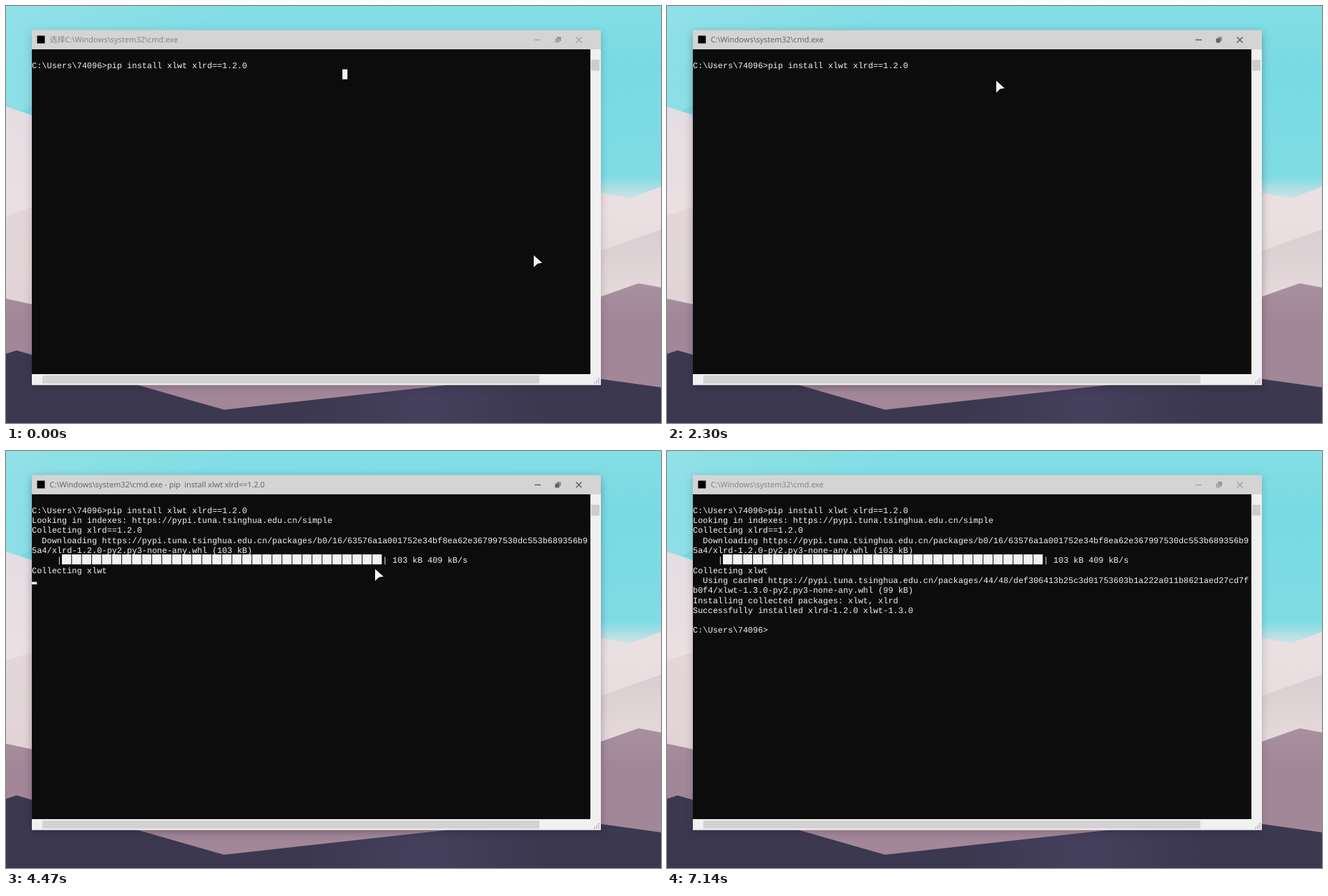
Animation of 937x597 px, one loop 7290 ms. Source, as an HTML page:

```html
<!DOCTYPE html>
<html lang="en">
<head>
<meta charset="utf-8">
<title>Package install in a terminal</title>
<style>
  html, body { margin: 0; width: 100%; height: 100%; overflow: hidden; background: #3c3850; }
  svg { display: block; width: 100vw; height: 100vh; }
  text { white-space: pre; text-rendering: geometricPrecision; }
  #console text { font: 11.94px "Liberation Mono", monospace; fill: #f2f2f2; }
  #title { font: 11px "Noto Sans", "Noto Sans CJK SC", sans-serif; }
</style>
</head>
<body>
<svg viewBox="0 0 937 597" preserveAspectRatio="none">
  <defs>
    <linearGradient id="sky" x2="0" y2="1">
      <stop offset="0" stop-color="#83dee5"/>
      <stop offset=".3" stop-color="#79dae3"/>
      <stop offset=".84" stop-color="#7edce4"/>
      <stop offset=".93" stop-color="#c3e1e6"/>
      <stop offset="1" stop-color="#e2dfe2"/>
    </linearGradient>
    <linearGradient id="skyLeft">
      <stop offset="0" stop-color="#9ae2e8" stop-opacity=".6"/>
      <stop offset="1" stop-color="#9ae2e8" stop-opacity="0"/>
    </linearGradient>
    <linearGradient id="snow" x2="0" y2="1">
      <stop offset="0" stop-color="#e4dde2"/>
      <stop offset=".5" stop-color="#ebe0e1"/>
      <stop offset="1" stop-color="#e3d6d7"/>
    </linearGradient>
    <linearGradient id="slope" x2="0" y2="1">
      <stop offset="0" stop-color="#dacdd1"/>
      <stop offset="1" stop-color="#e6dadb"/>
    </linearGradient>
    <linearGradient id="mauve" x2="0" y2="1">
      <stop offset="0" stop-color="#a8909f"/>
      <stop offset=".25" stop-color="#a28799"/>
      <stop offset="1" stop-color="#a28799"/>
    </linearGradient>
    <radialGradient id="night" gradientUnits="userSpaceOnUse" cx="600" cy="575" r="170">
      <stop offset="0" stop-color="#45405d"/>
      <stop offset="1" stop-color="#3c3850"/>
    </radialGradient>
  </defs>

  <rect width="937" height="290" fill="url(#sky)"/>
  <path d="M0 0H330L0 160Z" fill="url(#skyLeft)"/>
  <path d="M0 144L37 156L500 300L851 268L893 275L937 259V450H0Z" fill="url(#snow)"/>
  <path d="M0 300L37 288V430H0Z" fill="#e1d4d6" opacity=".8"/>
  <path d="M830 358L937 320V420H830Z" fill="url(#slope)"/>
  <path d="M0 419L37 427L400 480L851 416L905 397L937 403V597H0Z" fill="url(#mauve)"/>
  <path d="M0 498L15 493L312 578L790 525L851 534L937 546V597H0Z" fill="url(#night)"/>

  <rect id="shadow" x="37" y="34.5" width="814" height="508" fill="#d4d4d4"/>
  <rect x="44.5" y="42.5" width="11" height="11"/>
  <text id="title" x="62.5" y="52"></text>
  <g id="buttons" fill="none" stroke="currentColor" stroke-width="1.6">
    <path d="M756 48.5H765M815.5 44.5L823.5 52.5M823.5 44.5L815.5 52.5"/>
    <path d="M788 44H794V50H788Z" fill="#a28c90" stroke="none"/>
    <path d="M785.5 46.5H791.5V52.5H785.5Z" fill="currentColor" stroke="none"/>
  </g>
  <rect x="37" y="62" width="814" height="480.5" fill="#f0f0f0"/>
  <rect x="37" y="62" width="799" height="465" fill="#0c0c0c"/>
  <rect x="837" y="77" width="12" height="15.5" fill="#cdcdcd"/>
  <rect id="thumb" x="52" y="529" width="711" height="11.5"/>
  <path d="M841 539.5H849M844 536.5H849M847 533.5H849" stroke="#b5b5b5" stroke-width="2" stroke-dasharray="2 1"/>

  <g id="console"></g>
  <rect id="caret" width="7.2" fill="#f2f2f2"/>
  <circle id="ring" cx="470.5" cy="106" r="11" fill="#808004"/>
  <path id="pointer" d="M0 0L12 10.7L5.5 11.7L0 17Z" fill="#f2f2f2" stroke="#0c0c0c" stroke-width="3.4" paint-order="stroke"/>
</svg>
<script>
const LOOP = 7290, CELL = 7.165, ROW = 14.33, LEFT = 37, TOP = 62, BLOCKS = 32;
const el = id => document.getElementById(id);
const colX = col => LEFT + col * CELL;
const rowY = row => TOP + row * ROW;

function add(tag, attrs, text = '') {
  const node = document.createElementNS('http://www.w3.org/2000/svg', tag);
  for (const key in attrs) node.setAttribute(key, attrs[key]);
  node.textContent = text;
  return el('console').appendChild(node);
}
const show = (node, on) => node.setAttribute('visibility', on ? 'visible' : 'hidden');
const print = (row, col, text) => add('text', { x: colX(col), y: rowY(row) + 12.2 }, text);

const prompt = 'C:\\Users\\74096>';
const mirror = 'https://pypi.tuna.tsinghua.edu.cn/';
// [time, row, text]
const lines = [
  [0, 1, prompt + 'pip install xlwt xlrd==1.2.0'],
  [3300, 2, `Looking in indexes: ${mirror}simple`],
  [3770, 3, 'Collecting xlrd==1.2.0'],
  [4000, 4, `  Downloading ${mirror}packages/b0/16/63576a1a001752e34bf8ea62e367997530dc553b689356b9`],
  [4000, 5, '5a4/xlrd-1.2.0-py2.py3-none-any.whl (103 kB)'],
  [4080, 6, '     |'],
  [4470, 7, 'Collecting xlwt'],
  [4560, 8, `  Using cached ${mirror}packages/44/48/def306413b25c3d01753603b1a222a011b8621aed27cd7f`],
  [4560, 9, 'b0f4/xlwt-1.3.0-py2.py3-none-any.whl (99 kB)'],
  [4560, 10, 'Installing collected packages: xlwt, xlrd'],
  [4850, 11, 'Successfully installed xlrd-1.2.0 xlwt-1.3.0'],
  [4850, 13, prompt]
].map(([time, row, text]) => ({ time, node: print(row, 0, text) }));

const blocks = Array.from({ length: BLOCKS }, (_, i) =>
  add('rect', { x: colX(6 + 2 * i), y: rowY(6), width: 13.3, height: ROW, fill: '#f2f2f2' }));
const progress = print(6, 70, '');

const exe = 'C:\\Windows\\system32\\cmd.exe';
const titles = [[0, '选择' + exe], [1430, exe], [2620, exe + ' - pip  install xlwt xlrd==1.2.0'], [4850, exe]];

// [time, row, column, height]; only a time hides the caret
const carets = [
  [0, 2, 62, ROW], [1430], [1750, 1, 43], [2300], [2620, 2, 0], [2760], [3300, 3, 0],
  [3770, 4, 0], [4000], [4470, 8, 0], [4560, 11, 0], [4850, 13, 15], [4930], [5450, 13, 15],
  [5980], [6510, 13, 15], [7050]
];

const smooth = p => p * p * (3 - 2 * p);
const slowDown = p => p * (2 - p);
const speedUp = p => p ** 1.4;
// [start, step duration, steps, x, y, easing]
const moves = [
  [70, 75.5, 10, 489, 121, smooth],
  [810, 80, 4, 471, 107, slowDown],
  [4250, 73, 4, 528, 169, smooth],
  [4850, 80, 9, 716, 540, speedUp],
  [5560, 1, 1, 760, 640, smooth],
  [5650, 1, 1, 823, 592, smooth],
  [5725, 1, 1, 886, 592, smooth],
  [5800, 1, 1, 900, 640, smooth]
];

function pointerAt(t) {
  let x = 755, y = 357;
  for (const [start, step, count, toX, toY, ease] of moves) {
    if (t < start) break;
    const p = ease(Math.min(1, (Math.floor((t - start) / step) + 1) / count));
    x += (toX - x) * p;
    y += (toY - y) * p;
  }
  return [x, y];
}

const latest = (list, t) => list.filter(item => item[0] <= t).pop();

function draw(t) {
  for (const { time, node } of lines) show(node, t >= time);

  const done = Math.min(1, Math.max(0, Math.floor((t - 4080) / 80 + 1) / 5));
  blocks.forEach((block, i) => show(block, i < Math.round(done * BLOCKS)));
  progress.textContent = done ? `| ${Math.round(done * 103)} kB 409 kB/s` : '';

  const active = t >= 1210 && t < 7050;
  el('title').textContent = latest(titles, t)[1];
  el('title').style.fill = active ? '#656565' : '#858585';
  el('buttons').style.color = active ? '#625f63' : '#aea3a3';
  el('shadow').style.filter = `drop-shadow(0 3px 6px rgba(30,20,40,${active ? 0.34 : 0.22}))`;

  const [, row, col, height = 3.6] = latest(carets, t);
  show(el('caret'), row !== undefined);
  if (row !== undefined) {
    el('caret').setAttribute('x', colX(col));
    el('caret').setAttribute('y', rowY(row + 1) - height);
    el('caret').setAttribute('height', height);
  }

  const [x, y] = pointerAt(t);
  el('pointer').setAttribute('transform', `translate(${x} ${y})`);
  show(el('ring'), t >= 1210 && t < 1290);
  const hover = y > 527 && y < 543 && x < 763;
  el('thumb').setAttribute('fill', hover ? '#c0c0c0' : '#d2d2d2');
}

function frame() {
  draw(performance.now() % LOOP);
  requestAnimationFrame(frame);
}
frame();
</script>
</body>
</html>
```
